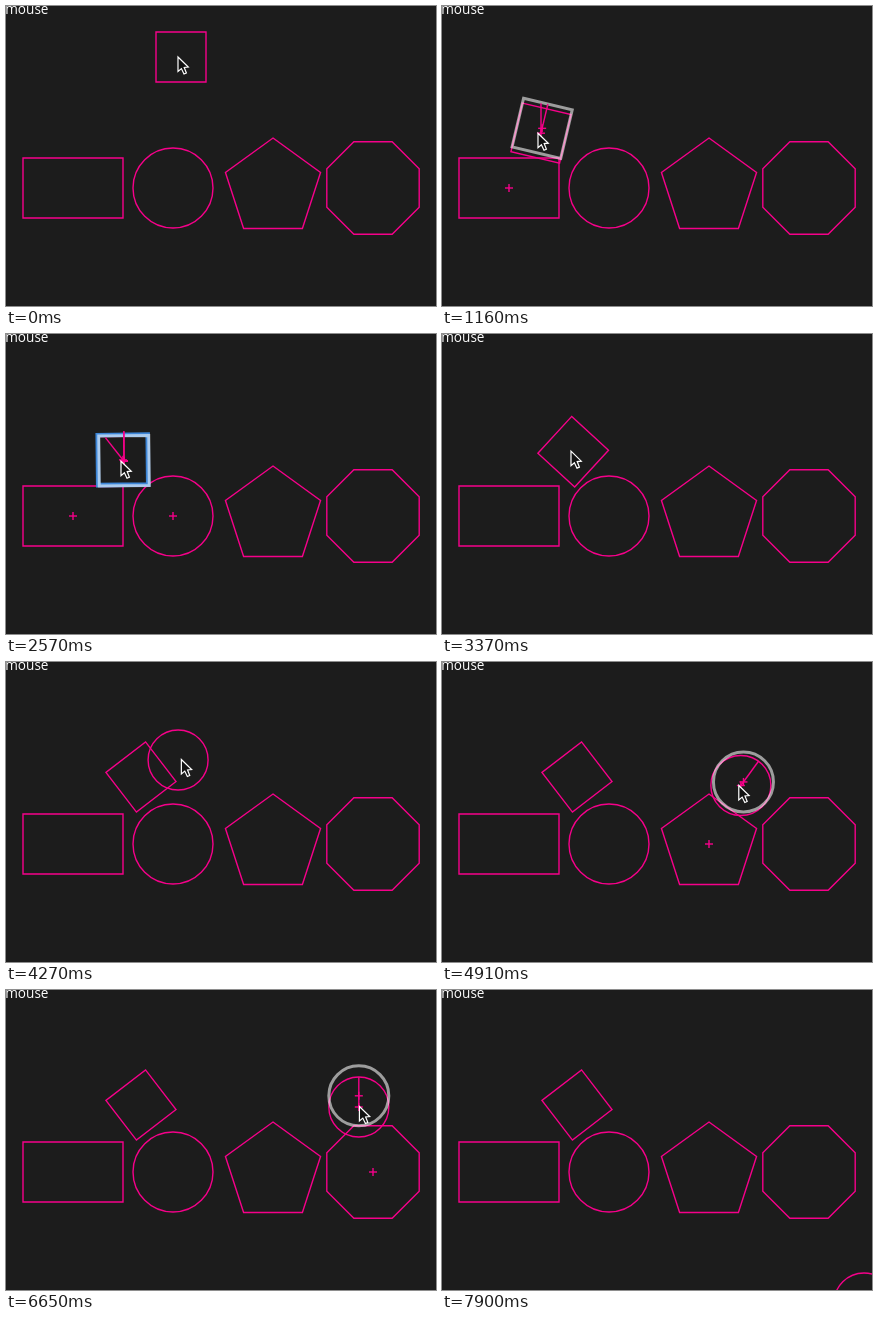
An HTML page with a canvas that plays this animation: 430 by 300 pixels, repeating every 7.92 s.

```html
<!DOCTYPE html>
<html lang="en">
<head>
<meta charset="utf-8">
<title>Collision demo</title>
<style>
html, body { margin: 0; width: 100%; height: 100%; overflow: hidden; background: #1c1c1c; }
canvas { display: block; }
</style>
</head>
<body>
<canvas id="stage" width="430" height="300"></canvas>
<script>
const ctx = document.getElementById('stage').getContext('2d');
const LOOP = 7920, DROP = 3940, LEAD = 28;
const PINK = '#f6008a', THIN = 1.4;

const clamp = u => Math.min(1, Math.max(0, u));
const ramp = (t, from, to) => clamp((t - from) / (to - from));
const ease = (t, from, to) => {
  const u = ramp(t, from, to);
  return u * u * (3 - 2 * u);
};

// The dragged square: drop onto the rectangle, nudge right, lift away
function squareAt(t) {
  const fall = ease(t, 30, 670), nudge = ease(t, 1420, 1950), lift = ease(t, 2850, 3600);
  return [175 - 76 * fall + 19 * nudge + 17 * lift, 51 + 76.2 * fall - 12.2 * lift];
}
const spin = t => 142.4 * ramp(t, 915, 3552) * Math.PI / 180;

// The dragged circle: hop to the pentagon, dip into the gap, climb the octagon, leave
function circleAt(t) {
  const hop = Math.sin(Math.PI * ramp(t, DROP, 4800));
  const climb = ease(t, 6150, 6680), back = ease(t, 7880, 7900);
  return [
    130 + 170 * ease(t, DROP, 4960) + 19 * ease(t, 4950, 5600) + 54 * ease(t, 6300, 6900)
      - 25 * ease(t, 6900, 7150) + 102 * ease(t, 7150, 7720) - 28 * back,
    112 - 15 * hop + 11.5 * ease(t, 4400, 4880) + 50 * ease(t, 4950, 5900)
      - 57 * climb + 223.5 * ease(t, 7250, 7720) - 27 * back
  ];
}
const dragAt = t => t < DROP ? squareAt(t) : circleAt(t);

const circle = (x, y, r) => ({ x, y, r });
function regular(x, y, n, r, start) {
  const pts = Array.from({ length: n }, (_, i) => {
    const a = start + i * 2 * Math.PI / n;
    return [x + r * Math.cos(a), y + r * Math.sin(a)];
  });
  return { x, y, pts };
}
const square = (x, y, angle) => regular(x, y, 4, 25 * Math.SQRT2, angle - Math.PI * 3 / 4);
const rect = (x, y, w, h) => ({
  x, y, pts: [[-1, -1], [1, -1], [1, 1], [-1, 1]].map(([i, j]) => [x + i * w / 2, y + j * h / 2])
});

const obstacles = [
  rect(67, 182, 100, 60),
  circle(167, 182, 40),
  regular(267, 182, 5, 50, -Math.PI / 2),
  regular(367, 182, 8, 50, Math.PI / 8)
];

const dot = (p, n) => p[0] * n[0] + p[1] * n[1];
function reach(s, n) {
  return s.pts ? Math.max(...s.pts.map(p => dot(p, n))) : dot([s.x, s.y], n) + s.r;
}
const unit = (x, y) => { const d = Math.hypot(x, y) || 1; return [x / d, y / d]; };

// Directions that may push the mover out; sign is -1 for the mover's own
function axes(s, other, sign) {
  if (s.pts) {
    return s.pts.map((p, i) => {
      const q = s.pts[(i + 1) % s.pts.length];
      return unit(sign * (q[1] - p[1]), sign * (p[0] - q[0]));
    });
  }
  const gap = p => Math.hypot(p[0] - s.x, p[1] - s.y);
  const near = other.pts
    ? other.pts.reduce((a, b) => gap(a) < gap(b) ? a : b)
    : [other.x, other.y];
  return [unit(sign * (near[0] - s.x), sign * (near[1] - s.y))];
}

function collide(mover, fixed) {
  const least = (a, b) => a.depth <= b.depth ? a : b;
  const best = list => list
    .map(n => ({ n, depth: reach(fixed, n) + reach(mover, [-n[0], -n[1]]) }))
    .reduce(least);
  const pair = [best(axes(fixed, mover, 1)), best(axes(mover, fixed, -1))];
  const min = pair.reduce(least);
  if (min.depth <= 0) return null;
  const push = min.n.map(c => c * min.depth);
  return { fixed, push, normals: fixed.pts && mover.pts ? pair : [min] };
}

function outline(s, color, width, [dx, dy] = [0, 0]) {
  ctx.beginPath();
  if (s.pts) {
    s.pts.forEach(p => ctx.lineTo(p[0] + dx, p[1] + dy));
    ctx.closePath();
  } else {
    ctx.arc(s.x + dx, s.y + dy, s.r, 0, 2 * Math.PI);
  }
  ctx.strokeStyle = color;
  ctx.lineWidth = width;
  ctx.stroke();
}

function line(x1, y1, x2, y2) {
  ctx.strokeStyle = PINK;
  ctx.lineWidth = THIN;
  ctx.beginPath();
  ctx.moveTo(x1, y1);
  ctx.lineTo(x2, y2);
  ctx.stroke();
}

function cross(x, y) {
  line(x - 4, y, x + 4, y);
  line(x, y - 4, x, y + 4);
}

function drawHits(body) {
  const hits = obstacles.map(o => collide(body, o)).filter(Boolean);
  const [first, ...others] = hits;
  others.forEach(hit => outline(body, '#3d86d8', 4.5, hit.push));
  if (first) outline(body, 'rgba(255,255,255,.57)', 3, first.push);
  hits.forEach(({ fixed, push, normals }) => {
    cross(fixed.x, fixed.y);
    cross(body.x, body.y);
    cross(body.x + push[0], body.y + push[1]);
    normals.forEach(({ n }) => line(body.x, body.y, body.x + 30 * n[0], body.y + 30 * n[1]));
  });
}

const arrow = [[0, 0], [0, 14.5], [3.4, 11.6], [6, 17], [8.4, 16], [6.2, 10.4], [10.3, 10]];
function drawCursor(x, y) {
  ctx.beginPath();
  arrow.forEach(p => ctx.lineTo(x + p[0], y + p[1]));
  ctx.closePath();
  ctx.fillStyle = '#111';
  ctx.fill();
  ctx.strokeStyle = '#fff';
  ctx.lineWidth = 1.2;
  ctx.stroke();
}

function render(t) {
  ctx.fillStyle = '#1c1c1c';
  ctx.fillRect(0, 0, 430, 300);
  ctx.fillStyle = '#fff';
  ctx.font = '13.6px "Open Sans", "Noto Sans", sans-serif';
  ctx.textAlign = 'right';
  ctx.fillText('mouse', 42.5, 8.4);

  obstacles.forEach(o => outline(o, PINK, THIN));
  const box = square(...squareAt(t), spin(t));
  outline(box, PINK, THIN);
  const body = t < DROP ? box : circle(...circleAt(t), 30);
  if (body !== box) outline(body, PINK, THIN);
  drawHits(body);

  // The pointer runs slightly ahead of the body it drags
  const ahead = t < DROP ? Math.min(t + LEAD, DROP - 1) : t + LEAD;
  const [x, y] = dragAt(ahead);
  drawCursor(x - 3, y);
}

const start = performance.now();
function tick() {
  render((performance.now() - start) % LOOP);
  requestAnimationFrame(tick);
}
tick();
</script>
</body>
</html>
```
